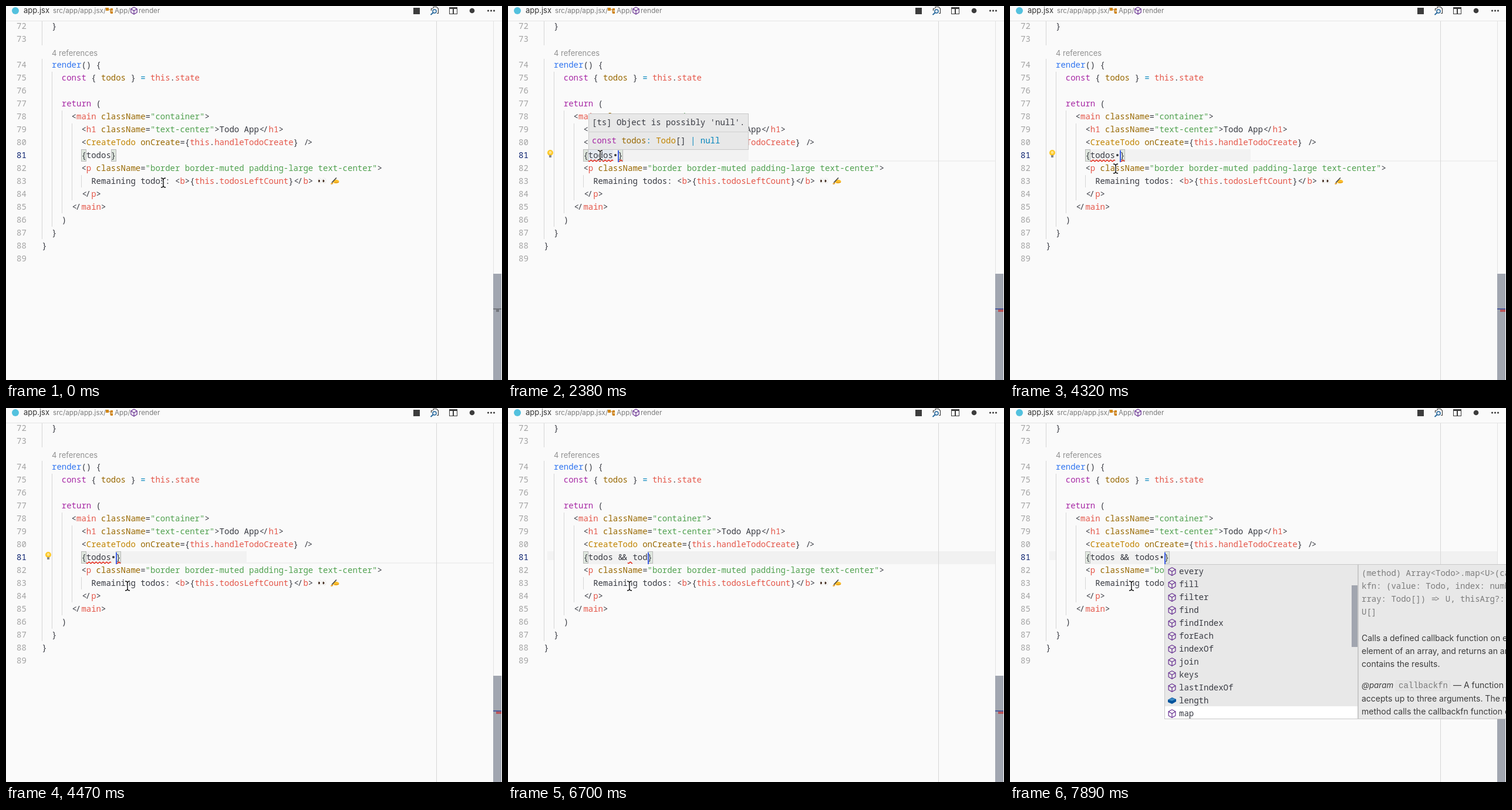
An HTML page with a canvas that plays this animation: 845x637 px, repeating every 8 s.

```html
<!DOCTYPE html>
<html lang="en">
<head>
<meta charset="utf-8">
<title>Editor</title>
<style>
  html, body { margin: 0; width: 100%; height: 100%; overflow: hidden; background: #fafafa; }
  canvas { display: block; }
</style>
</head>
<body>
<canvas id="stage" width="845" height="637"></canvas>
<script>
const g = document.getElementById('stage').getContext('2d');
const LOOP = 8000, CELL = 8.4, LEFT = 61.2, ROW = 22;
const MONO = '14px "Noto Sans Mono", "DejaVu Sans Mono", monospace';
const sans = (size, style = '') => `${style} ${size}px Inter, "Open Sans", sans-serif`;
const INK = {
  d: '#383a42', k: '#a626a4', b: '#2f74f0', r: '#e45649', g: '#50a14f',
  y: '#986801', c: '#c18401', o: '#0184bc', m: '#7c7c7c'
};

// "~" starts a colour run; the next letter picks the ink
const CODE = {
  72: [2, '~d}'],
  74: [2, '~brender~d() {'],
  75: [4, '~kconst~d { ~ytodos~d } ~o=~d ~rthis~d.~rstate'],
  77: [4, '~kreturn~d ('],
  78: [6, '~d<~rmain ~yclassName~d=~g"container"~d>'],
  79: [8, '~d<~rh1 ~yclassName~d=~g"text-center"~d>Todo App</~rh1~d>'],
  80: [8, '~d<~cCreateTodo ~yonCreate~d={~rthis~d.~rhandleTodoCreate~d} />'],
  82: [8, '~d<~rp ~yclassName~d=~g"border border-muted padding-large text-center"~d>'],
  83: [10, '~dRemaining todos: <~rb~d>{~rthis~d.~rtodosLeftCount~d}</~rb~d>'],
  84: [8, '~d</~rp~d>'],
  85: [6, '~d</~rmain~d>'],
  86: [4, '~d)'],
  87: [2, '~d}'],
  88: [0, '~d}']
};
const METHODS = 'every fill filter find findIndex forEach indexOf join keys lastIndexOf length map'.split(' ');

// Timelines: the last entry whose time has passed is in force
const TYPED = [
  [0, 'todos'], [150, 'todos•'], [4920, 'todos'], [5070, 'todos '], [5660, 'todos &'],
  [5800, 'todos &&'], [5950, 'todos && '], [6400, 'todos && t'], [6550, 'todos && to'],
  [6700, 'todos && tod'], [6850, 'todos && todo'], [7000, 'todos && todos'], [7750, 'todos && todos•']
];
const CARET = [
  [0, 0], [150, 1], [600, 0], [1040, 1], [1640, 0], [2080, 1], [2530, 0], [3130, 1],
  [3580, 0], [4020, 1], [4620, 0], [4920, 1], [7450, 0], [7750, 1]
];
const MOUSE = [
  [0, [268, 301]], [1490, [244, 297]], [1640, [212, 281]], [1790, [184, 267]], [1930, [166, 258]],
  [2080, [157, 254]], [4320, [180, 277]], [4470, [207, 303]]
];
const at = (list, t) => list.findLast(e => e[0] <= t)[1];
const within = (t, from, to) => t >= from && t < to;

const col = n => LEFT + CELL * n;
const baseline = n => n < 74 ? 39 + ROW * (n - 72) : 105 + ROW * (n - 74);

function box(x, y, w, h, fill, stroke) {
  if (fill) { g.fillStyle = fill; g.fillRect(x, y, w, h); }
  if (stroke) { g.strokeStyle = stroke; g.lineWidth = 1; g.strokeRect(x + .5, y + .5, w - 1, h - 1); }
}
function disc(x, y, r, fill, ry = r) {
  g.fillStyle = fill;
  g.beginPath(); g.ellipse(x, y, r, ry, 0, 0, 7); g.fill();
}
function line(points, stroke, width = 1) {
  g.strokeStyle = stroke; g.lineWidth = width;
  g.beginPath(); points.forEach(p => g.lineTo(...p)); g.stroke();
}
function label(s, x, y, font, fill) {
  g.font = font; g.fillStyle = fill; g.fillText(s, x, y);
}

// Pulls paired symbols together like ligatures: [first, second] shift
const PAIRS = { '</': [1, -1.2], '/>': [1.2, -1], '=>': [1.2, -1.2], '&&': [.5, -.8] };
function nudge(text, i) {
  const first = PAIRS[text.slice(i, i + 2)], second = i && PAIRS[text.slice(i - 1, i + 1)];
  return first ? first[0] : second ? second[1] : 0;
}
function mono(runs, x, y) {
  const text = runs.replace(/~./g, '');
  let i = 0;
  g.font = MONO;
  for (const run of runs.split('~').slice(1)) {
    g.fillStyle = INK[run[0]];
    for (const ch of run.slice(1)) {
      const px = x + CELL * i;
      if (ch === '•') disc(px + 4.2, y - 5, 2, INK.d);
      else g.fillText(ch, px + nudge(text, i), y);
      i++;
    }
  }
}

function cube(x, y, r) {
  const p = a => [x + r * Math.sin(a * Math.PI / 3), y - r * Math.cos(a * Math.PI / 3)];
  line([0, 1, 2, 3, 4, 5, 0].map(p), '#652d90', 1.2);
  line([p(5), [x, y], p(1)], '#652d90', 1.2);
  line([[x, y], p(3)], '#652d90', 1.2);
}
function brick(x, y) {
  const shape = (fill, pts) => {
    g.fillStyle = fill;
    g.beginPath(); pts.forEach(([a, b]) => g.lineTo(x + a, y + b)); g.fill();
  };
  shape('#00539c', [[-7, -1], [0, -5], [7, -2], [7, 2], [0, 6], [-7, 3]]);
  shape('#3f8ac4', [[-6, -1], [0, -4], [6, -2], [0, 1]]);
}
function squiggle(x1, x2) {
  const pts = [];
  for (let x = x1; x <= x2; x++) pts.push([x, 263.5 + 1.2 * Math.sin((x - x1) * Math.PI / 3)]);
  line(pts, '#e51400', 1.2);
}

function header() {
  box(0, 25, 845, 1, '#e4e4e4');
  disc(16, 8, 6, '#53c1de');
  label('app.jsx', 30, 12, sans(13), '#333');
  label('src/app/app.jsx/', 80, 12, sans(11.7), '#7b7b7b');
  label('App/', 185, 12, sans(11.7), '#7b7b7b');
  label('render', 226, 12, sans(11.7), '#7b7b7b');
  line([[173, 6], [178, 6], [178, 11], [180, 11]], '#b8751a', 1.2);
  box(170, 3, 5, 5, '#d18616');
  box(178, 4, 4, 4, '#d18616');
  box(178, 9, 4, 4, '#d18616');
  cube(218, 8, 6);
  box(694, 3, 11, 11, '#3c3c3c');
  line([[728, 4], [728, 1.5], [733.5, 1.5], [736.5, 4.5], [736.5, 12.5], [734, 12.5]], '#424242', 1.2);
  line([[727, 4.5], [724.5, 4.5], [724.5, 8]], '#424242', 1.2);
  g.strokeStyle = '#23659a'; g.lineWidth = 1.5;
  g.beginPath(); g.arc(730, 9, 3, 0, 7); g.stroke();
  line([[728, 11], [723.5, 15]], '#23659a', 1.8);
  box(755, 2, 14, 12, null, '#3c3c3c');
  box(755, 2, 14, 3, '#3c3c3c');
  box(761, 2, 2, 12, '#3c3c3c');
  disc(794, 8, 4.3, '#3c3c3c');
  [821.5, 826.5, 831.5].forEach(x => disc(x, 8, 1.6, '#3c3c3c'));
}

function emoji() {
  for (const x of [534.5, 542]) {
    disc(x, 297.5, 3.2, '#d9d9d4', 4.5);
    disc(x, 297.5, 2.6, '#fff', 3.9);
    disc(x - 1, 298, 1.5, '#4a3428', 2.2);
  }
  disc(562, 299, 5.5, '#fcbf2d', 3.3);
  line([[557, 302], [553.5, 303]], '#e59b1c', 2);
  line([[555, 301], [563, 292.5]], '#4b4b4b', 1.8);
  line([[560, 300.5], [567, 300.5]], '#dd931c');
}

function gutterAndCode() {
  [[0, 26, 67], [0, 90, 397], [2, 112, 376], [4, 178, 353], [6, 200, 331], [8, 288, 309]]
    .forEach(([c, top, end]) => box(Math.round(col(c)), top, 1, end - top, '#d6d6d6'));
  for (let n = 72; n < 90; n++) {
    label(n, 18, baseline(n), MONO, n === 81 ? '#0b216f' : '#a3a3a3');
    if (CODE[n]) mono(CODE[n][1], col(CODE[n][0]), baseline(n));
  }
  label('4 references', 78, 85, sans(13), '#919191');
  emoji();
}

function scrollbar(t, error) {
  box(733, 26, 1, 611, '#d7d7d7');
  box(830, 26, 1, 611, '#e3e3e3');
  box(830, 456, 14, 181, '#a1a6b0');
  box(835, 516, 5, 5, '#73767d');
  if (error) box(835, 516, 9, 5, '#b9555a');
  box(830, 515, 14, 2, t < 450 ? '#74777e' : '#4c5b9b');
}

function lineHighlight(t) {
  if (t >= 4920) {
    box(67, 244, 11, 15, '#f3f3f3');
    box(137, 244, 693, 22, '#f1f1f1');
  } else {
    if (t >= 450) box(195, 263, 635, 2, '#f0f0f0');
    if (t >= 2380) box(137, 244, 273, 21, '#f2f2f2');
  }
  if (within(t, 2380, 4320)) box(137, 245, 42, 20, '#e4e9f0');
}

function activeLine(t, error) {
  const text = at(TYPED, t), end = 9 + text.length;
  for (const c of [8, end]) box(Math.round(col(c)), 244, 9, 21, '#dfe7de', '#b9b9b9');
  mono(`~d{${text}}`, col(8), baseline(81));
  if (within(t, 450, 5210)) {
    squiggle(137, 179);
    if (text.endsWith('•')) squiggle(188, 195);
  } else if (error) squiggle(204, 212);
  if (within(t, 750, 5210)) {
    disc(72, 250, 5, '#fdc827');
    disc(72, 249.5, 2.4, '#ffe48a');
    box(70, 254, 4, 4, '#8a8a8a');
  }
  if (at(CARET, t)) box(Math.round(col(end)), 246, 2, 20, '#3f5fe8');
}

function tooltip() {
  box(137, 183, 273, 62, '#e8e8e8', '#c8c8c8');
  box(138, 214, 271, 1, '#d0d0d0');
  mono("~d[ts] Object is possibly 'null'.", 143, 203);
  mono('~kconst ~ytodos~o: ~cTodo~d[] ~o| null', 143, 234);
}

function suggestions() {
  box(263, 266, 330, 264, '#e8e8e8', '#c8c8c8');
  box(264, 508, 328, 21, '#fff');
  METHODS.forEach((name, i) => {
    const y = 278 + ROW * i;
    name === 'length' ? brick(276, y) : cube(276, y + .5, 6.8);
    mono('~d' + name, 288, y + 4.5);
  });
  box(582, 302, 10, 105, '#a1a5af');

  box(593, 266, 260, 264, '#e8e8e8', '#c8c8c8');
  ['(method) Array<Todo>.map<U>(ca', 'kfn: (value: Todo, index: numb', 'rray: Todo[]) => U, thisArg?: ', 'U[]']
    .forEach((s, i) => mono('~m' + s, 599, 286 + ROW * i));
  [
    [397, 'Calls a defined callback function on each'],
    [419, 'element of an array, and returns an array'],
    [441, 'contains the results.'],
    [500, 'accepts up to three arguments. The map'],
    [522, 'method calls the callbackfn function one']
  ].forEach(([y, s]) => label(s, 599, y, sans(14), '#3c3c3c'));
  label('@param', 599, 477, sans(13.4, 'italic'), '#3c3c3c');
  box(657, 464, 93, 18, '#e4e4e4', '#dedede');
  label('callbackfn', 662, 477, '14px "Liberation Mono", monospace', '#7a7a7a');
  label('— A function that', 755, 477, sans(14), '#3c3c3c');
}

function pointer([x, y]) {
  for (const [ink, w] of [['#fff', 3.4], ['#111', 1.4]]) {
    line([[x, y - 6], [x, y + 6]], ink, w);
    for (const s of [-1, 1]) {
      const cap = [[-4, 8], [-1.5, 7.5], [0, 6], [1.5, 7.5], [4, 8]];
      line(cap.map(([a, b]) => [x + a, y + b * s]), ink, w);
    }
  }
}

function draw() {
  const t = performance.now() % LOOP;
  const error = within(t, 450, 5210) || within(t, 6400, 7450);
  box(0, 0, 845, 637, '#fafafa');
  header();
  lineHighlight(t);
  scrollbar(t, error);
  gutterAndCode();
  activeLine(t, error);
  if (within(t, 2380, 4320)) tooltip();
  if (t >= 7890) suggestions();
  pointer(at(MOUSE, t));
  requestAnimationFrame(draw);
}
draw();
</script>
</body>
</html>
```
